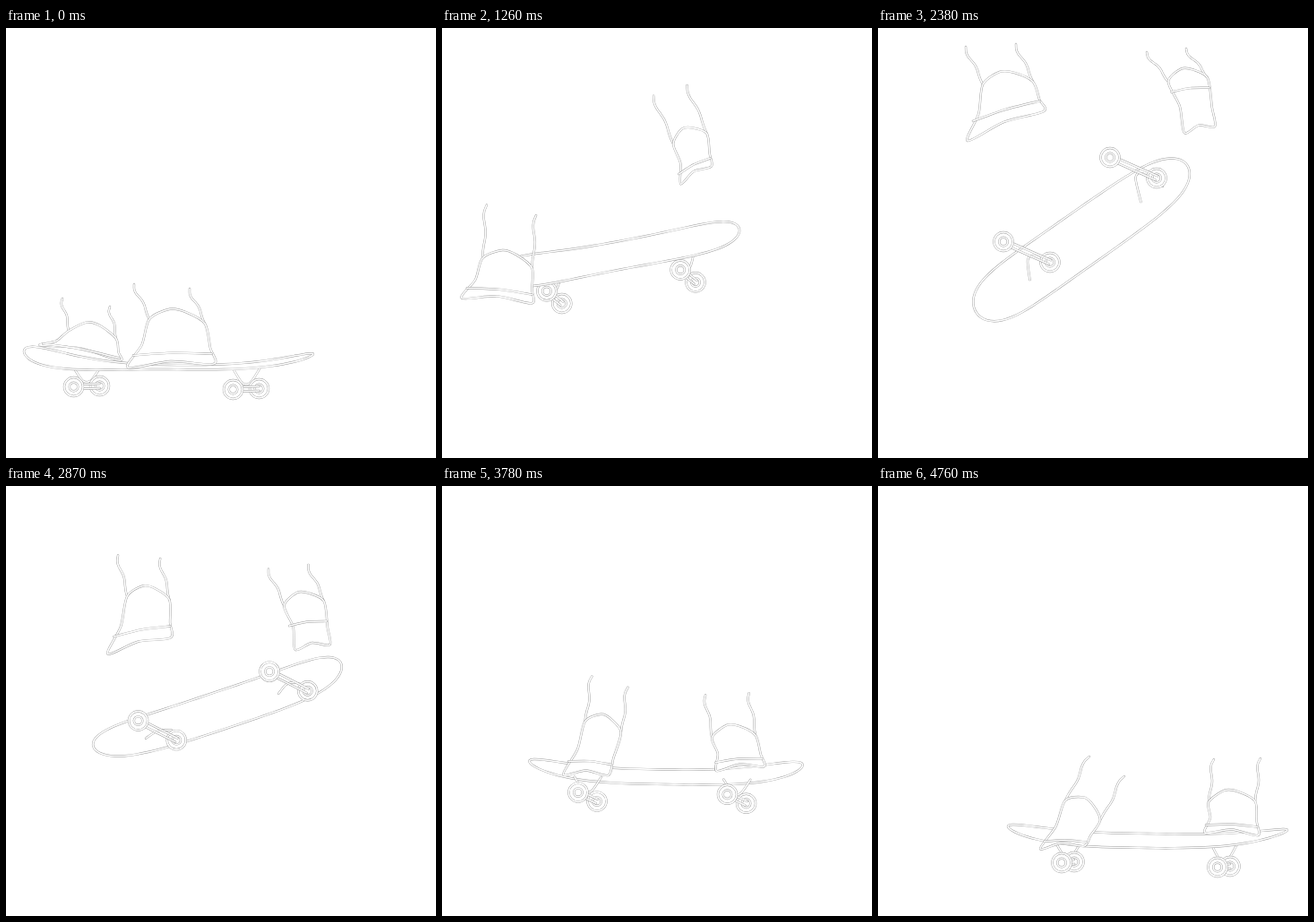
Write an HTML page with a canvas that moves like this. It is 480 px wide and 480 px high and loops after 4830 ms.

```html
<!DOCTYPE html>
<html lang="en">
<head>
<meta charset="utf-8">
<title>Skateboard flip</title>
<style>
html, body { margin: 0; width: 100%; height: 100%; overflow: hidden; background: #fff; }
canvas { display: block; width: 480px; height: 480px; }
</style>
</head>
<body>
<canvas id="stage" width="480" height="480"></canvas>
<script>
const ctx = document.getElementById('stage').getContext('2d');
const STEP = 70, LOOP = 4830, WHEEL = 10.5;
const SIDES = [-1, 1];

const mix = (a, b, t) => a + (b - a) * t;
const mixPoint = (a, b, t) => [mix(a[0], b[0], t), mix(a[1], b[1], t)];
const move = (p, d, k = 1) => [p[0] + d[0] * k, p[1] + d[1] * k];
const turn = ([x, y], a) =>
  [x * Math.cos(a) - y * Math.sin(a), x * Math.sin(a) + y * Math.cos(a)];

// Length, unit direction and unit normal of the way from p to q.
function span(p, q) {
  const dx = q[0] - p[0], dy = q[1] - p[1], len = Math.hypot(dx, dy) || 1;
  return { len, dir: [dx / len, dy / len], normal: [-dy / len, dx / len] };
}

// Blends numbers and everything built from them.
function blend(a, b, t) {
  if (typeof a === 'number') return mix(a, b, t);
  if (Array.isArray(a)) return a.map((v, i) => blend(v, b[i], t));
  return Object.fromEntries(Object.keys(a).map(k => [k, blend(a[k], b[k], t)]));
}

// Half widths at the left end, middle and right end; belly is the sag between the ends.
// Trucks are kept in the turned frame of the board.
function board(p, q, [left, middle, right], belly, trucks, axle) {
  const mid = mixPoint(p, q, 0.5);
  const angle = Math.atan2(q[1] - p[1], q[0] - p[0]);
  return {
    mid, angle, half: span(p, q).len / 2, left, middle, right, belly, axle,
    trucks: trucks.map(c => turn(move(c, mid, -1), -angle))
  };
}

// Both ankle points, both sole ends, and the way up the leg.
const foot = (ankleA, ankleB, heel, toe, leg, sole = 0.25) =>
  ({ ankleA, ankleB, heel, toe, leg, sole });

const poses = [
  { time: 0,
    board: board([20, 361], [343, 364], [16, 2.5, 5], 16, [[90, 400], [268, 403]], [29, -1]),
    left: foot([70, 338], [123, 347], [127, 371], [38, 354], [-7, -36], 0.1),
    right: foot([160, 325], [222, 330], [232, 375], [136, 379], [-17, -39]) },
  { time: 700,
    board: board([116, 403], [238, 155], [29, 29, 29], 0, [[178, 374], [249, 230]], [-5, 1]),
    left: foot([40, 333], [92, 330], [88, 375], [38, 374], [4, -65]),
    right: foot([224, 163], [270, 177], [242, 234], [203, 203], [-13, -58]) },
  { time: 1750,
    board: board([105, 144], [325, 304], [16, 4, 9], 8, [[135, 205], [246, 295]], [36, 25]),
    left: foot([50, 190], [108, 214], [111, 248], [8, 238], [5, -54]),
    right: foot([288, 100], [318, 66], [352, 85], [322, 149], [-30, -50]) },
  { time: 2380,
    board: board([110, 318], [345, 153], [31, 30, 27], 0, [[166, 250], [285, 156]], [52, 23]),
    left: foot([117, 63], [173, 60], [185, 93], [100, 126], [-19, -42], 0.35),
    right: foot([324, 60], [368, 56], [376, 110], [342, 117], [-24, -33], 0.8) },
  { time: 3430,
    board: board([97, 254], [394, 257], [7, 11, 15], 14, [[157, 293], [319, 292]], [32, 20]),
    left: foot([156, 192], [193, 203], [182, 257], [129, 258], [0, -50]),
    right: foot([295, 218], [340, 212], [345, 254], [301, 258], [-10, -50]) },
  { time: 4200,
    board: board([98, 371], [413, 377], [11, 5, 7], 17, [[169, 412], [341, 418]], [8, -2]),
    left: foot([164, 348], [208, 362], [190, 402], [143, 399], [17, -51]),
    right: foot([309, 356], [362, 358], [377, 384], [313, 390], [-4, -44]) },
  { time: 4760,
    board: board([145, 380], [457, 384], [8, 8, 5], 14, [[212, 420], [386, 425]], [14, -1]),
    left: foot([209, 351], [248, 373], [230, 402], [181, 405], [27, -49], 0.15),
    right: foot([369, 353], [421, 352], [424, 390], [365, 387], [6, -48]) }
];

// White line with a thin grey rim.
function ink(path, fill) {
  ctx.lineCap = ctx.lineJoin = 'round';
  if (fill) {
    ctx.fillStyle = '#fff';
    ctx.fill(path);
  }
  for (const [color, width] of [['#999', 2.4], ['#fff', 1.6]]) {
    ctx.strokeStyle = color;
    ctx.lineWidth = width;
    ctx.stroke(path);
  }
}

function curve(list, closed) {
  const path = new Path2D(), n = list.length, k = 0.14;
  const at = i => closed ? list[(i + n) % n] : list[Math.max(0, Math.min(n - 1, i))];
  path.moveTo(...list[0]);
  for (let i = 0; i < (closed ? n : n - 1); i++) {
    const a = at(i), b = at(i + 1);
    const c1 = move(a, move(b, at(i - 1), -1), k);
    const c2 = move(b, move(at(i + 2), a, -1), -k);
    path.bezierCurveTo(...c1, ...c2, ...b);
  }
  if (closed) path.closePath();
  return path;
}

function wheel([x, y]) {
  for (const r of [WHEEL, WHEEL * 0.45]) {
    const ring = new Path2D();
    ring.arc(x, y, r, 0, 7);
    ink(ring, true);
  }
}

function drawBoard(b, trucksInFront) {
  const place = p => move(turn(p, b.angle), b.mid);
  const sag = s => b.belly * (1 - Math.abs(s) ** 3);
  const width = s => mix(b.middle, s < 0 ? b.left : b.right, s * s) * Math.sqrt(1 - s ** 6);

  const deck = () => {
    const rim = [];
    for (let i = 0; i < 48; i++) {
      const a = Math.PI * (1 + i / 24), s = Math.cos(a);
      rim.push(place([s * b.half, sag(s) + Math.sign(Math.sin(a)) * width(s)]));
    }
    ink(curve(rim, true), true);
  };

  const truck = c => {
    const hub = place(c), s = c[0] / b.half;
    const base = sag(s) + Math.min(width(s), 4);
    const [m1, m2] = SIDES.map(d => place([c[0] + d * 15, base]));
    ink(curve([m1, mixPoint(m1, hub, 0.7), mixPoint(m2, hub, 0.7), m2]));
    const near = move(hub, b.axle, -0.5), far = move(hub, b.axle, 0.5);
    const { normal } = span(near, far);
    wheel(far);
    for (const d of SIDES) ink(curve([move(near, normal, d * 2.5), move(far, normal, d * 2.5)]));
    wheel(near);
  };

  const trucks = () => b.trucks.forEach(truck);
  (trucksInFront ? [deck, trucks] : [trucks, deck]).forEach(part => part());
}

// A leg line sways a little on its way down to the ankle.
function drawLeg(ankle, leg) {
  const top = move(ankle, leg), { normal } = span(top, ankle), line = [];
  for (let i = 0; i <= 8; i++) {
    const u = i / 8;
    line.push(move(mixPoint(top, ankle, u), normal, 3 * Math.sin(u * Math.PI * 2.5) * (1 - u)));
  }
  ink(curve(line));
}

function drawFoot({ ankleA, ankleB, heel, toe, leg, sole }) {
  const up = span(ankleB, ankleA).normal, down = span(heel, toe).normal;
  const middle = (p, q, normal, out, u = 0.5) => move(mixPoint(p, q, u), normal, out);
  const front = span(ankleA, toe).normal;
  drawLeg(ankleA, leg);
  drawLeg(ankleB, leg);
  ink(curve([
    ankleA, middle(ankleA, ankleB, up, 13, 0.35), middle(ankleA, ankleB, up, 11, 0.65),
    ankleB, mixPoint(ankleB, heel, 0.6), heel, middle(heel, toe, down, 5), toe,
    middle(toe, ankleA, front, -4)
  ], true), true);
  const a = mixPoint(toe, ankleA, sole), b = mixPoint(heel, ankleB, sole);
  ink(curve([a, middle(a, b, down, 2), b]));
}

function draw(time) {
  let i = 0;
  while (i < poses.length - 2 && time >= poses[i + 1].time) i++;
  const a = poses[i], b = poses[i + 1];
  const u = (time - a.time) / (b.time - a.time);
  // The jump eases in and out; the flight and landing run evenly.
  const now = blend(a, b, i ? u : u * u * (3 - 2 * u));

  ctx.fillStyle = '#fff';
  ctx.fillRect(0, 0, 480, 480);
  // The underside faces the viewer during the flip.
  drawBoard(now.board, time > 1300 && time < 3800);
  drawFoot(now.left);
  drawFoot(now.right);
}

const start = performance.now();
function tick() {
  const time = (performance.now() - start) % LOOP;
  draw(Math.floor(time / STEP) * STEP);
  requestAnimationFrame(tick);
}
tick();
</script>
</body>
</html>
```
